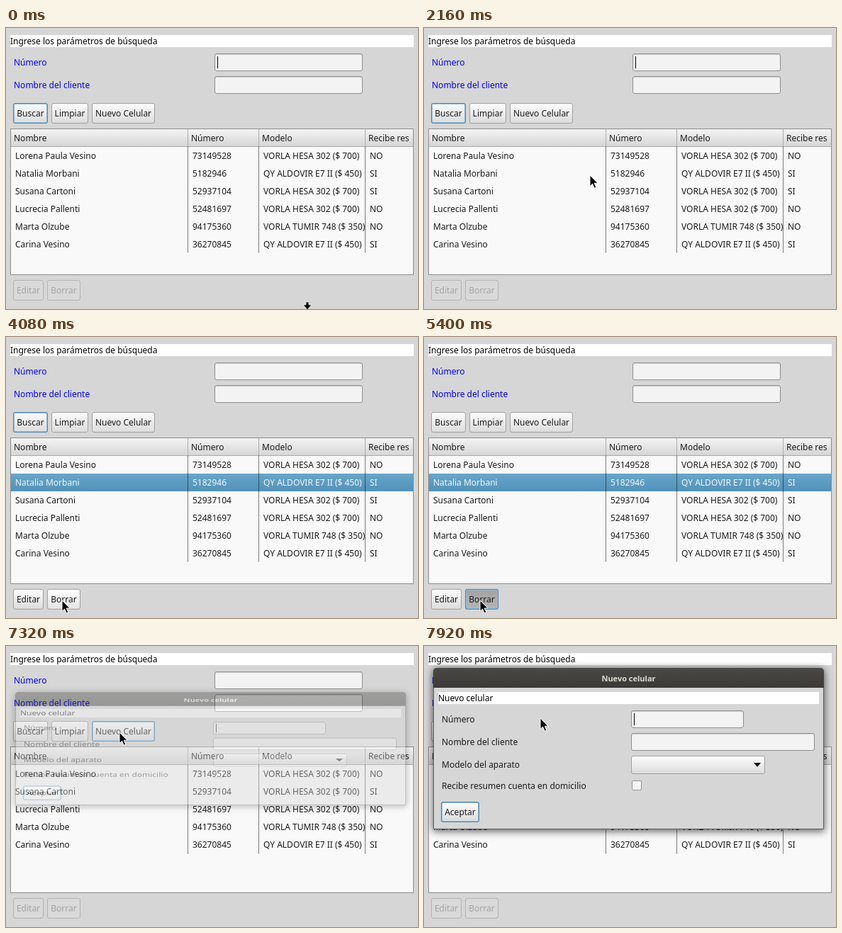
Write an HTML page that moves like this. It is 581 by 397 pixels and loops after 8 s.

```html
<!DOCTYPE html>
<html lang="es">
<head>
<meta charset="utf-8">
<title>Búsqueda de celulares</title>
<style>
* { box-sizing: border-box; }
html, body { margin: 0; width: 100%; height: 100%; overflow: hidden; }
body {
  position: relative;
  background: #d6d6d6;
  color: #1a1a1a;
  font: 12px/25px "Noto Sans", sans-serif;
  white-space: nowrap;
  cursor: default;
}
.abs, .strip, .label, .field, .btn, .caret { position: absolute; }
.strip { height: 17px; line-height: 17px; background: #fff; color: #000; }
.label { left: 11px; color: #0000f0; }
.field {
  height: 25px;
  border: 1px solid #8e8e8e;
  border-radius: 3px;
  background: #f3f3f3;
  box-shadow: inset 0 1px 1px #d2d2d2;
}
.caret { left: 3px; top: 3px; width: 1px; height: 17px; background: #000; }

.btn {
  height: 29px;
  line-height: 27px;
  text-align: center;
  border: 1px solid #a0a0a0;
  border-radius: 3px;
  background: linear-gradient(#fcfcfc, #dcdcdc);
}
.ring::after {
  content: "";
  position: absolute;
  inset: -1px;
  border: 1px solid #4c86ab;
  border-radius: 3px;
  box-shadow: inset 0 0 0 1px #8fbfdc;
}

/* results table */
.table {
  left: 6px; top: 142px; width: 569px; height: 207px;
  border: 1px solid #8c8c8c;
  background: #f9f9f9;
  overflow: hidden;
}
.head, .row { display: grid; grid-template-columns: 250px 100px 150px 67px; height: 25px; overflow: hidden; }
.head { background: linear-gradient(#f4f4f4, #d6d6d6); border-bottom: 1px solid #a9a9a9; }
.head span { padding-left: 4px; border-right: 1px solid #adadad; overflow: hidden; }
.head span:last-child { border: 0; }
.row span { padding-left: 6px; overflow: hidden; }
.rows { position: relative; }
.rows i {
  position: absolute; top: 0; bottom: 0; width: 1px;
  background: repeating-linear-gradient(#000 0 1px, transparent 1px 2px);
}

/* dialog */
.dialog {
  left: 13px; top: 31px; width: 551px; height: 228px;
  background: #d6d6d6;
  border: 1px solid #5a5a5a;
  border-radius: 5px 5px 0 0;
  box-shadow: 0 2px 11px 1px rgba(0, 0, 0, .6);
}
.dialog > * { margin: -1px 0 0 -1px; }
.bar {
  inset: 0 -1px auto 0; height: 28px;
  border-radius: 5px 5px 0 0;
  background: linear-gradient(#4a4946, #3b3a37);
  color: #dfdbd2;
  font-weight: bold; font-size: 11px; line-height: 29px;
  text-align: center;
}
.dialog .label { left: 12px; color: #1a1a1a; }
.arrow { right: 5px; top: 9px; border: 5px solid transparent; border-top: 6px solid #111; border-bottom: 0; }
.check { left: 280px; top: 159px; width: 14px; height: 14px; border: 1px solid #949494; border-radius: 2px; background: #f5f5f5; }

.pointer { left: 0; top: 0; overflow: visible; }

/* timeline: 1.5% is 120 ms */
.a { animation: 8s step-end infinite; }
.blink { animation-name: blink; }
.pick { animation-name: pick; }
.enable { animation-name: enable; }
.press { animation-name: press; }
.hover { animation-name: hover; }
.ring::after { animation: 8s step-end infinite; }
.search::after { animation-name: searchRing; }
.press::after { animation-name: pressRing; }
.hover::after { animation-name: newRing; }
.dialog { animation-name: open; }
.pointer { animation-name: move; }
.resize { animation-name: resize; }

@keyframes blink {
  0%, 13.5%, 27% { opacity: 1; }
  7.5%, 22.5%, 28.5%, 100% { opacity: 0; }
}
@keyframes pick {
  0% { background: none; color: #1a1a1a; height: 25px; }
  28.5% { background: linear-gradient(#68a6ca, #5192b8); color: #f4f8fa; height: 25px; }
  70.5%, 100% { background: none; color: #1a1a1a; height: 0; }
}
@keyframes enable {
  0%, 70.5%, 100% { background: #d9d9d9; border-color: #b3b3b3; color: #a4a4a4; }
  28.5% { background: linear-gradient(#fcfcfc, #dcdcdc); border-color: #a0a0a0; color: #1a1a1a; }
}
@keyframes press {
  0%, 70.5%, 100% { background: #d9d9d9; border-color: #b3b3b3; color: #a4a4a4; }
  28.5% { background: linear-gradient(#fcfcfc, #dcdcdc); border-color: #a0a0a0; color: #1a1a1a; }
  46.5% { background: linear-gradient(#fff, #e4e4e4); border-color: #a0a0a0; color: #1a1a1a; }
  67.5% { background: linear-gradient(#a2a2a2, #b4b4b4); border-color: #808080; color: #1a1a1a; }
}
@keyframes hover {
  0%, 91.5%, 100% { background: linear-gradient(#fcfcfc, #dcdcdc); }
  82.5% { background: linear-gradient(#fff, #e4e4e4); }
  90% { background: linear-gradient(#a2a2a2, #b4b4b4); }
}
@keyframes searchRing {
  0%, 70.5% { opacity: 1; }
  67.5%, 90%, 100% { opacity: 0; }
}
@keyframes pressRing {
  0%, 70.5%, 100% { opacity: 0; }
  67.5% { opacity: 1; }
}
@keyframes newRing {
  0% { opacity: 0; }
  90%, 100% { opacity: 1; }
}
@keyframes open {
  0% { opacity: 0; transform: scaleY(.7); }
  91.5% { opacity: .4; transform: scaleY(.7); }
  93% { opacity: .8; transform: scaleY(.833); }
  94.5% { opacity: .94; transform: scaleY(.94); }
  96%, 100% { opacity: 1; transform: none; }
}
@keyframes resize {
  0% { opacity: 1; }
  1.5%, 100% { opacity: 0; }
}
@keyframes move {
  0% { transform: translate(425px, 400px); }
  1.5% { transform: translate(390px, 340px); }
  3% { transform: translate(285px, 238px); }
  4.5% { transform: translate(236px, 207px); }
  7.5% { transform: translate(234px, 208px); }
  36% { transform: translate(198px, 222px); }
  37.5% { transform: translate(106px, 262px); }
  39% { transform: translate(36px, 298px); }
  40.5% { transform: translate(17px, 320px); }
  42% { transform: translate(15px, 338px); }
  43.5% { transform: translate(28px, 352px); }
  45% { transform: translate(55px, 363px); }
  46.5% { transform: translate(89px, 362px); }
  48% { transform: translate(80px, 370px); }
  51% { transform: translate(79px, 372px); }
  73.5% { transform: translate(86px, 340px); }
  75% { transform: translate(100px, 262px); }
  76.5% { transform: translate(104px, 165px); }
  78% { transform: translate(95px, 88px); }
  79.5% { transform: translate(93px, 104px); }
  81% { transform: translate(117px, 103px); }
  82.5% { transform: translate(136px, 109px); }
  84% { transform: translate(150px, 116px); }
  85.5% { transform: translate(157px, 120px); }
  87% { transform: translate(160px, 122px); }
  96% { transform: translate(161px, 117px); }
  97.5% { transform: translate(163px, 108px); }
  99%, 100% { transform: translate(164px, 102px); }
}
</style>
</head>
<body>
<div class="strip" style="left:6px;top:10px;width:569px">Ingrese los parámetros de búsqueda</div>
<div class="label" style="top:36px">Número</div>
<div class="field" style="left:294px;top:36px;width:209px"><div class="caret a blink"></div></div>
<div class="label" style="top:68px">Nombre del cliente</div>
<div class="field" style="left:294px;top:68px;width:209px"></div>

<div class="btn ring search" style="left:10px;top:106px;width:49px">Buscar</div>
<div class="btn" style="left:64px;top:106px;width:52px">Limpiar</div>
<div class="btn ring a hover" style="left:121px;top:106px;width:89px">Nuevo Celular</div>

<div class="abs table">
  <div class="head"><span>Nombre</span><span>Número</span><span>Modelo</span><span>Recibe res</span></div>
  <div class="rows">
    <div class="row"><span>Lorena Paula Vesino</span><span>73149528</span><span>VORLA HESA 302 ($ 700)</span><span>NO</span></div>
    <div class="row a pick"><span>Natalia Morbani</span><span>5182946</span><span>QY ALDOVIR E7 II ($ 450)</span><span>SI</span></div>
    <div class="row"><span>Susana Cartoni</span><span>52937104</span><span>VORLA HESA 302 ($ 700)</span><span>SI</span></div>
    <div class="row"><span>Lucrecia Pallenti</span><span>52481697</span><span>VORLA HESA 302 ($ 700)</span><span>NO</span></div>
    <div class="row"><span>Marta Olzube</span><span>94175360</span><span>VORLA TUMIR 748 ($ 350)</span><span>NO</span></div>
    <div class="row"><span>Carina Vesino</span><span>36270845</span><span>QY ALDOVIR E7 II ($ 450)</span><span>SI</span></div>
    <i style="left:249px"></i><i style="left:349px"></i><i style="left:499px"></i>
  </div>
</div>

<div class="btn a enable" style="left:10px;top:356px;width:43px">Editar</div>
<div class="btn ring a press" style="left:58px;top:356px;width:47px">Borrar</div>

<div class="abs dialog a">
  <div class="abs bar">Nuevo celular</div>
  <div class="strip" style="left:7px;top:34px;width:537px">Nuevo celular</div>
  <div class="label" style="top:60px">Número</div>
  <div class="field" style="left:279px;top:60px;width:159px"><div class="caret"></div></div>
  <div class="label" style="top:92px">Nombre del cliente</div>
  <div class="field" style="left:279px;top:92px;width:259px"></div>
  <div class="label" style="top:124px">Modelo del aparato</div>
  <div class="btn" style="left:279px;top:124px;width:189px;height:26px"><div class="abs arrow"></div></div>
  <div class="label" style="top:154px">Recibe resumen cuenta en domicilio</div>
  <div class="abs check"></div>
  <div class="btn ring" style="left:11px;top:189px;width:54px">Aceptar</div>
</div>

<svg class="abs a resize" style="left:418px;top:386px" width="14" height="11">
  <path d="M5 1h4v4h4l-6 7-6-7h4z" stroke="#fff" stroke-width=".8"/>
</svg>
<svg class="abs a pointer" width="12" height="20">
  <path d="M0 0V15.5L3.6 12.2 6.2 18.2 8.8 17 6.2 11.2H11Z" stroke="#fff" stroke-width="1" stroke-linejoin="round"/>
</svg>
</body>
</html>
```
